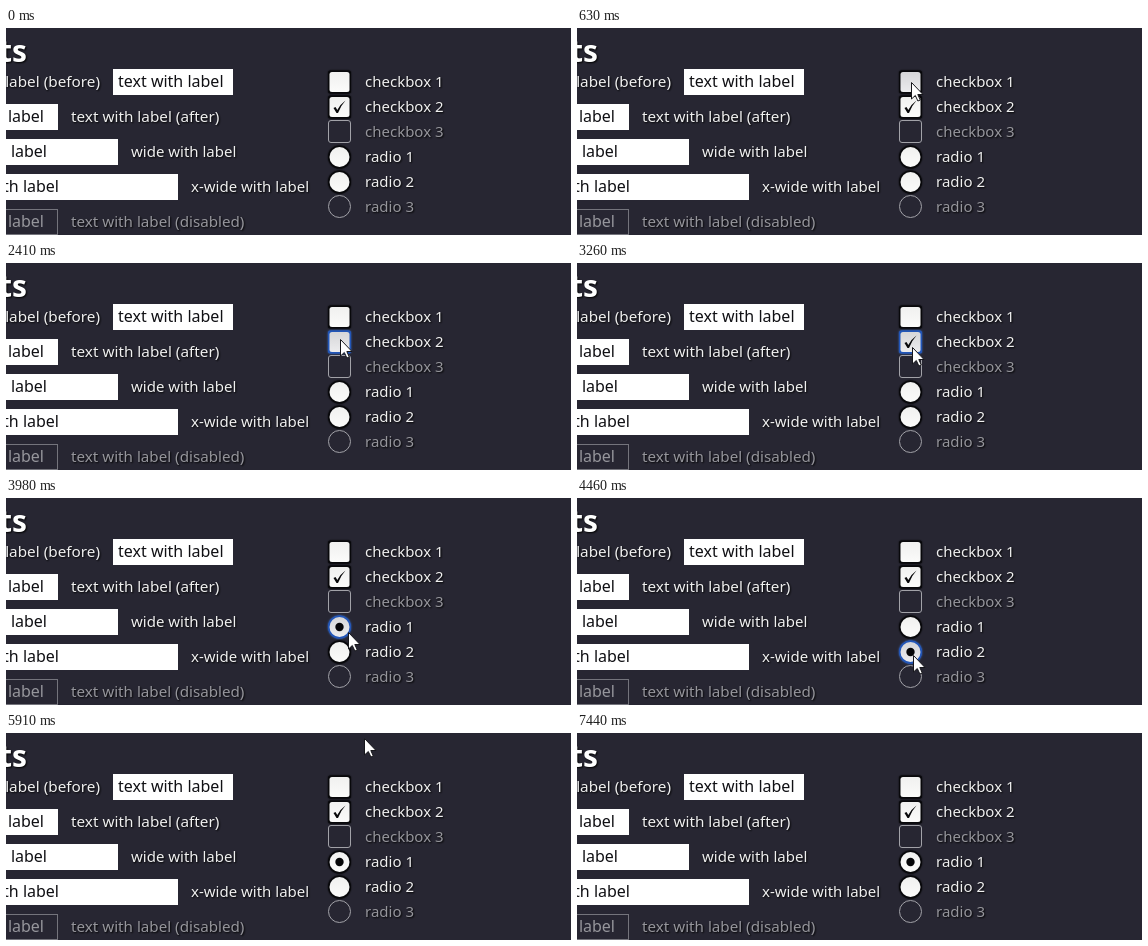
An HTML page with a canvas for the animation above (7470 ms loop, 565 by 207 pixels).

```html
<!DOCTYPE html>
<html lang="en">
<head>
<meta charset="utf-8">
<title>Form controls</title>
<style>
  html, body { margin: 0; width: 100%; height: 100%; overflow: hidden; background: #272632; }
  canvas { display: block; }
</style>
</head>
<body>
<canvas id="stage" width="565" height="207"></canvas>
<script>
const ctx = document.getElementById('stage').getContext('2d');
const LOOP = 7470, STEP = 30;
const CX = 333.5;
const FONT = '"Noto Sans", "Open Sans", sans-serif';
const rowY = i => 54 + 25 * i;

// Pointer: each move starts one step in and then rests at its end point.
const moves = [
  { start: 30, end: 630, from: [468, 206], to: [334, 54] },
  { start: 1930, end: 2110, to: [334, 76] },
  { start: 3260, end: 3370, to: [342, 124] },
  { start: 3980, end: 4160, from: [343, 132], to: [336, 157] },
  { start: 4670, end: 4850, to: [337, 123] },
  { start: 5420, end: 5610, to: [358, 5] },
  { start: 7360, end: 7440, to: [503, 4] }
];

// Focus changes on press, the value on release.
const clicks = [
  { down: 820, up: 890, off: 920, target: 0 },
  { down: 1600, up: 1660, off: 1690, target: 0 },
  { down: 2320, up: 2380, off: 2410, target: 1 },
  { down: 2910, up: 3000, off: 3030, target: 1 },
  { down: 3660, up: 3720, off: 3750, target: 3 },
  { down: 4370, up: 4430, off: 4460, target: 4 },
  { down: 5090, up: 5150, off: 5180, target: 3 },
  { down: 5800, up: 5880, off: 5910, target: -1 }
];

const ease = u => u * u * (3 - 2 * u);

function pointerAt(t) {
  if (t < 30 || t >= 7440) return null;
  let pos = [0, 0];
  for (const m of moves) {
    if (t < m.start) break;
    const from = m.from || pos;
    const steps = Math.ceil((m.end - m.start) / STEP);
    const n = t >= m.end ? steps : Math.floor((t - m.start) / STEP) + 1;
    const k = ease(Math.min(1, n / steps));
    pos = from.map((v, i) => v + (m.to[i] - v) * k);
  }
  return pos.map(Math.round);
}

function stateAt(t) {
  const s = { checks: [false, true, false], radio: -1, focus: -1, pressed: false };
  for (const c of clicks) {
    if (t < c.down) break;
    s.focus = c.target;
    s.pressed = t < c.off;
    if (t < c.up || c.target < 0) continue;
    if (c.target < 3) s.checks[c.target] = !s.checks[c.target];
    else s.radio = c.target;
  }
  return s;
}

function text(str, x, y, { size = 15, color = '#f0f0f0', align = 'left', weight = 400, shadow = true } = {}) {
  ctx.save();
  ctx.font = `${weight} ${size}px ${FONT}`;
  ctx.textAlign = align;
  ctx.fillStyle = color;
  if (shadow) {
    ctx.shadowColor = '#000';
    ctx.shadowOffsetX = ctx.shadowOffsetY = 1;
    ctx.shadowBlur = 2;
  }
  ctx.fillText(str, x, y);
  ctx.restore();
}

function field(x, y, right, disabled) {
  if (disabled) {
    ctx.strokeStyle = '#74747c';
    ctx.strokeRect(x + .5, y + .5, right - x - 1, 25);
  } else {
    ctx.fillStyle = '#fff';
    ctx.fillRect(x, y, right - x, 26);
  }
}

function drawFields() {
  const black = { size: 16, color: '#101014', shadow: false };
  const end = { ...black, align: 'right' };
  const gray = '#96969c';
  text('ts', 21, 34, { size: 30, weight: 600, color: '#fff', align: 'right' });
  text('text with label (before)', 94, 59, { size: 15.3, align: 'right' });
  field(107, 41, 227);
  text('text with label', 112, 59, black);
  field(-20, 76, 52);
  text('text with label', 38, 94, end);
  text('text with label (after)', 65, 94, { size: 15.3 });
  field(-20, 111, 112);
  text('wide with label', 41, 129, end);
  text('wide with label', 125, 129);
  field(-20, 146, 172);
  text('x-wide with label', 53, 164, end);
  text('x-wide with label', 185, 164);
  field(-20, 181, 52, true);
  text('text with label', 38, 199, { ...end, color: gray });
  text('text with label (disabled)', 65, 199, { size: 15.2, color: gray });
}

function shape(round, y, r) {
  ctx.beginPath();
  if (round) ctx.arc(CX, y, r, 0, Math.PI * 2);
  else ctx.roundRect(CX - r, y - r, 2 * r, 2 * r, 2.5);
}

function tick(y) {
  ctx.beginPath();
  ctx.moveTo(327.5, y + 1);
  ctx.lineTo(329.5, y);
  ctx.lineTo(331.3, y + 3);
  ctx.quadraticCurveTo(334.5, y - 3, 339.5, y - 6.5);
  ctx.quadraticCurveTo(334.5, y - 1, 332, y + 6);
  ctx.lineTo(330.5, y + 6);
  ctx.closePath();
  ctx.fillStyle = '#08080a';
  ctx.fill();
}

function control(i, on, focused, hovered) {
  const round = i > 2, y = rowY(i);
  if (i % 3 === 2) {
    shape(round, y - .5, 11);
    ctx.strokeStyle = '#a2a2a8';
    ctx.lineWidth = 1;
    ctx.stroke();
    return;
  }
  ctx.save();
  ctx.shadowColor = focused ? '#3478f0' : '#000';
  ctx.shadowBlur = 2;
  shape(round, y, 11.5);
  ctx.fillStyle = focused ? '#2256b8' : '#08080b';
  ctx.fill();
  ctx.restore();
  const fill = ctx.createLinearGradient(0, y - 10, 0, y + 10);
  fill.addColorStop(0, hovered ? '#d6d6d8' : '#f0f0ef');
  fill.addColorStop(1, hovered ? '#ececee' : '#fbfbfa');
  shape(round, y, 10);
  ctx.fillStyle = fill;
  ctx.fill();
  if (!on) return;
  if (round) {
    shape(true, y, 4.2);
    ctx.fillStyle = '#060608';
    ctx.fill();
  } else tick(y);
}

function isOver(p, i) {
  if (!p) return false;
  const dx = p[0] - CX, dy = p[1] - rowY(i);
  return i > 2 ? Math.hypot(dx, dy) < 12.5 : Math.max(Math.abs(dx), Math.abs(dy)) < 12;
}

function drawPointer([x, y], pressed) {
  const outline = [[0, 0], [0, 16.5], [3.8, 13], [6.4, 18.5], [8.8, 17.5], [6.3, 12], [11.5, 12]];
  ctx.beginPath();
  for (const [dx, dy] of outline) ctx.lineTo(x + dx + .5, y + dy + .5);
  ctx.closePath();
  ctx.fillStyle = '#fff';
  ctx.fill();
  ctx.strokeStyle = '#17171c';
  ctx.lineWidth = 1;
  ctx.stroke();
  if (!pressed) return;
  ctx.beginPath();
  ctx.arc(x, y, 15, 0, Math.PI * 2);
  ctx.fillStyle = 'rgba(238, 232, 40, .7)';
  ctx.fill();
}

function draw(t) {
  const state = stateAt(t), pointer = pointerAt(t);
  ctx.fillStyle = '#272632';
  ctx.fillRect(0, 0, 565, 207);
  ctx.lineWidth = 1;
  drawFields();
  for (let i = 0; i < 6; i++) {
    const on = i < 3 ? state.checks[i] : state.radio === i;
    control(i, on, state.focus === i, isOver(pointer, i));
    const name = i < 3 ? 'checkbox' : 'radio';
    text(`${name} ${i % 3 + 1}`, 359, rowY(i) + 5, { color: i % 3 === 2 ? '#96969c' : '#f0f0f0' });
  }
  if (pointer) drawPointer(pointer, state.pressed);
}

const began = performance.now();
function frame() {
  draw((performance.now() - began) % LOOP);
  requestAnimationFrame(frame);
}
frame();
</script>
</body>
</html>
```
